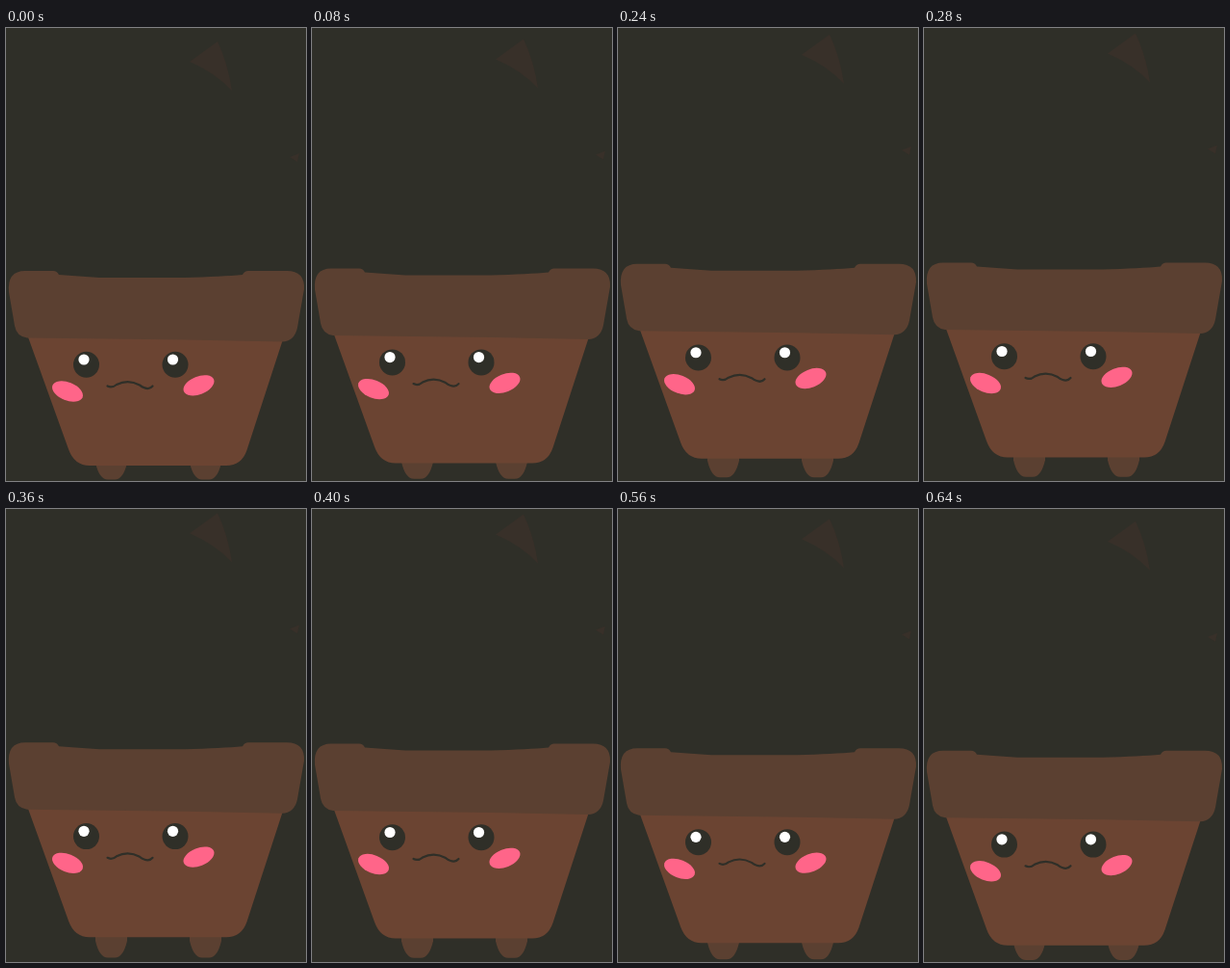
Recreate the animation shown at these times as an HTML page with a canvas. Size 312 px wide and 470 px high, loop 0.68 s.

```html
<!DOCTYPE html>
<html lang="en">
<head>
<meta charset="utf-8">
<title>Bouncing pot</title>
<style>
  html, body { margin: 0; width: 100%; height: 100%; overflow: hidden; background: #2f2f28; }
  canvas { display: block; }
</style>
</head>
<body>
<canvas id="stage" width="312" height="470"></canvas>
<script>
const ctx = document.getElementById('stage').getContext('2d');
const LOOP = 680, STEP = 40, LIFT = 10.3, FOOT_LIFT = 3.2;
const DARK = '#2f2f28', CLAY = '#6b4432', RIM = '#5b4031', PINK = '#ff6589', SHARD = '#383029';

const bodyShape = new Path2D('M22 318 L65 437 Q71 454 87 454 H229 Q245 454 250.5 438 L289 320 Z');
const rimShape = new Path2D(
  'M20 252 H49 Q53 252 55 256 Q75 257.5 97 259 H186 Q225 258 246 256 ' +
  'Q248 252 252 252 H292 Q311 252 310 271 L303 311 Q300 325 287 325.5 ' +
  'L187 323.5 L22 321.5 Q11 320 9 309 L3 274 Q1 252 20 252 Z');
const footShape = new Path2D('M0 440 H33 V451 Q29 468.5 20 468.5 H13 Q4 468.5 0 451 Z');
const mouthShape = new Path2D('M105.5 371.5 Q110 374 115 370 Q127 364 139 370.5 Q148 377 152.5 371.5');
const shardShape = new Path2D('M220 14 L191 35 Q217 46 235 65 Q231 37 220 14 Z');
const chipShape = new Path2D('M295 134 L305 130 L303 139 Z');

function fill(shape, color) {
  ctx.fillStyle = color;
  ctx.fill(shape);
}

function ellipse(x, y, rx, ry, color, angle = 0) {
  ctx.fillStyle = color;
  ctx.beginPath();
  ctx.ellipse(x, y, rx, ry, angle, 0, Math.PI * 2);
  ctx.fill();
}

function shifted(x, y, draw) {
  ctx.save();
  ctx.translate(x, y);
  draw();
  ctx.restore();
}

function drawPot() {
  fill(bodyShape, CLAY);
  fill(rimShape, RIM);
  for (const x of [83.5, 176]) {
    ellipse(x, 349.3, 13.5, 13.5, DARK);
    ellipse(x - 2.5, 344, 5.6, 5.6, '#fff');
  }
  ellipse(64, 377, 16.8, 9.3, PINK, 0.38);
  ellipse(200.5, 370.8, 16.8, 9.3, PINK, -0.38);
  ctx.strokeStyle = DARK;
  ctx.lineWidth = 2.2;
  ctx.lineCap = 'round';
  ctx.stroke(mouthShape);
}

function render(now) {
  const t = Math.floor((now % LOOP) / STEP) * STEP;
  const rise = 1 - Math.abs(2 * t / LOOP - 1);
  ctx.fillStyle = DARK;
  ctx.fillRect(0, 0, 312, 470);
  for (const x of [93, 191]) {
    shifted(x, -FOOT_LIFT * rise, () => fill(footShape, RIM));
  }
  shifted(0, -LIFT * rise, () => {
    fill(shardShape, SHARD);
    fill(chipShape, SHARD);
    drawPot();
  });
}

const start = performance.now();
function tick() {
  render(performance.now() - start);
  requestAnimationFrame(tick);
}
tick();
</script>
</body>
</html>
```
